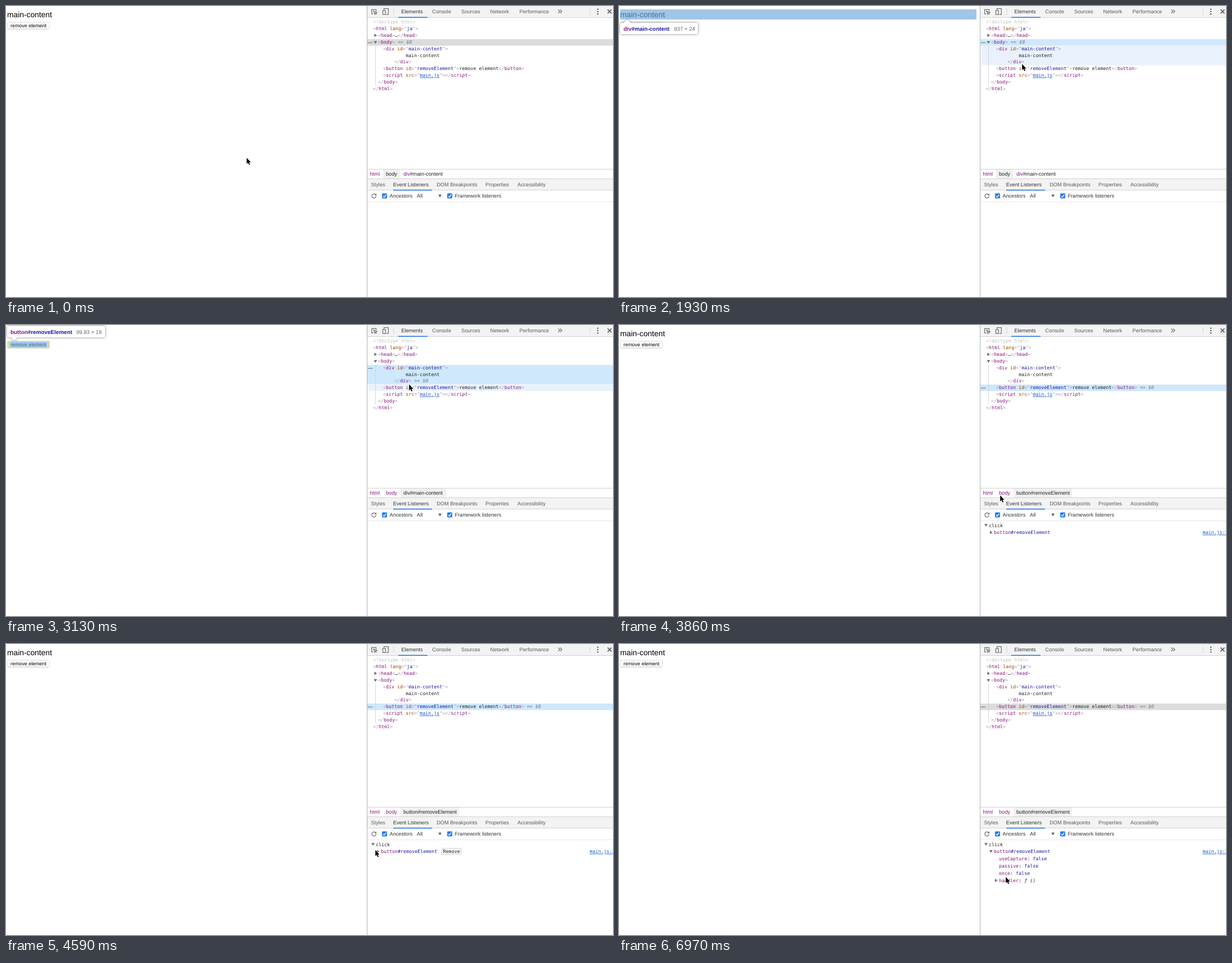
Recreate the animation shown at these times as an HTML page. Size 1080x518 px, loop 8000 ms.

```html
<!DOCTYPE html>
<html lang="en">
<head>
<meta charset="utf-8">
<style>
html, body { margin: 0; width: 100%; height: 100%; overflow: hidden; background: #fff; }
svg { display: block; }
text { font: 9.2px "Liberation Sans", Arial, sans-serif; white-space: pre; text-rendering: geometricPrecision; fill: #222; }
.code { font: 8.33px "DejaVu Sans Mono", Menlo, monospace; }
.page { font-size: 13.8px; fill: #000; }
.btn { font-size: 8.93px; fill: #000; }
.tip { font-size: 9.9px; font-weight: bold; }
.size { font-size: 9.5px; fill: #666; }
.tab { fill: #5a5a5a; }
.on { fill: #333; }
.g { fill: #a894a6; }
.t { fill: #881280; }
.n { fill: #994500; }
.v { fill: #1a1aa6; }
.doc { fill: #c0c0c0; }
.link { fill: #1155cc; text-decoration: underline; }
.dim { fill: #777; }
.it { font-style: italic; }
.icon { fill: none; stroke: #6e6e6e; stroke-width: 1.2; }
.shadow { filter: drop-shadow(0 0.7px 2px rgba(0,0,0,.5)); }
</style>
</head>
<body>
<svg id="stage" width="1080" height="518"></svg>
<script>
const LOOP = 8000, STEP = 148.3, LEAD = 12;
const stage = document.getElementById('stage');

const rect = (x, y, w, h, fill, more = '') =>
  `<rect x="${x}" y="${y}" width="${w}" height="${h}" fill="${fill}" ${more}/>`;
const path = (d, more = 'class="icon"') => `<path d="${d}" ${more}/>`;
const text = (x, y, s, cls = '') => `<text x="${x}" y="${y}" class="${cls}">${s}</text>`;
const code = (x, y, s) => text(x, y, s, 'code');
const span = (cls, s) => `<tspan class="${cls}">${s}</tspan>`;
const right = (x, y) => path(`M${x} ${y - 3}l4.6 3-4.6 3z`, 'fill="#6e6e6e"');
const down = (x, y) => path(`M${x} ${y - 2.2}h6l-3 4.6z`, 'fill="#6e6e6e"');

// DOM tree helpers
const lineY = i => 30.9 + 11.93 * i;
const open = (name, attr, val, cls = 'v') =>
  span('g', '&lt;') + span('t', name) +
  (attr ? ' ' + span('n', attr) + span('g', '="') + span(cls, val) + span('g', '"') : '') +
  span('g', '&gt;');
const close = name => span('g', '&lt;/') + span('t', name) + span('g', '&gt;');
const prop = (name, val, cls = 'v') => span('t', name) + ': ' + span(cls, val);
const fn = span('v it', 'ƒ') + span('it', ' ()');

const rows = { body: [59, 11.6], div: [71, 34.4], button: [106, 11.6] };

// Cursor tip: step, x, y
const track = [
  [2, 428, 270], [7, 705, 57], [8, 705, 57], [13, 717, 103], [20, 717, 103],
  [21, 717, 105.5], [22, 717, 107], [24, 717, 107], [26, 678, 303],
  [31, 657, 366.5], [33, 657, 366.5], [40, 671, 414.5], [43, 688, 414.5]
];

function cursorAt(k) {
  const j = track.findIndex(p => p[0] >= k);
  if (j < 0) return track[track.length - 1].slice(1);
  if (j === 0) return track[0].slice(1);
  const [a, ax, ay] = track[j - 1], [b, bx, by] = track[j];
  const u = (k - a) / (b - a), e = u * u * (3 - 2 * u);
  return [ax + (bx - ax) * e, ay + (by - ay) * e];
}

function page(target) {
  let s = text(2, 19.9, 'main-content', 'page') +
    rect(2.5, 28.8, 75, 12, '#fff', 'rx="2" stroke="#d4d4d4" stroke-width=".8"') +
    path('M4 41.1h72', 'stroke="#bdbdbd" stroke-width=".6"') +
    text(8, 37.9, 'remove element', 'btn');
  if (target === 'div') {
    s += rect(2, 6, 634, 18, 'rgba(111,168,220,.66)') +
      tooltip(30, 138.5, 'M8 30.2l6.5-5.7 6.5 5.7z', 'div', 'main-content', '837 × 24', 98);
  }
  if (target === 'button') {
    s += path('M2.5 28.6h75v12.7h-75zM8 30.2v9.6h64.5v-9.6z', 'fill="rgba(147,196,125,.55)"') +
      rect(3, 29.1, 74, 11.7, 'none', 'stroke="rgba(255,229,153,.66)"') +
      rect(8, 30.2, 64.5, 9.6, 'rgba(111,168,220,.66)') +
      tooltip(2, 174.5, 'M8 21.8l6.5 6 6.5-6z', 'button', 'removeElement', '99.83 × 18', 125);
  }
  return s;
}

function tooltip(y, w, arrow, tag, id, size, sizeX) {
  return `<g class="shadow">${rect(2, y, w, 20, '#fff', 'rx="2"')}${path(arrow, 'fill="#fff"')}</g>` +
    text(8, y + 13.7, span('t', tag) + span('v', '#' + id), 'tip') +
    text(sizeX, y + 13.5, size, 'size');
}

function tree(sel, hover, focused) {
  let s = '';
  const [sy, sh] = rows[sel];
  if (hover && hover !== sel) {
    const [y, h] = rows[hover];
    s += rect(645, y, 445, h, '#e9f1fc', 'rx="4"');
  }
  s += rect(643, sy, 437, sh, focused ? '#cfe8fc' : '#dcdcdc');
  for (const x of [645.3, 648.2, 651.1])
    s += `<circle cx="${x}" cy="${sy + 6.3}" r="1" fill="#6e6e6e"/>`;
  s += rect(657, 71, .8, 70, '#ccccd8');
  const mark = name => name === sel ? span('dim', ' == ') + span('dim it', '$0') : '';
  const lines = [
    [653, span('doc', '&lt;!doctype html&gt;')],
    [653, open('html', 'lang', 'ja')],
    [662, open('head') + '…' + close('head')],
    [662, open('body') + mark('body')],
    [671, open('div', 'id', 'main-content')],
    [711.3, 'main-content'],
    [691.2, close('div') + mark('div')],
    [671, open('button', 'id', 'removeElement') + 'remove element' + close('button') + mark('button')],
    [671, open('script', 'src', 'main.js', 'link') + close('script')],
    [662, close('body')],
    [653, close('html')]
  ];
  lines.forEach(([x, line], i) => s += code(x, lineY(i), line));
  return s + right(655.4, 52.3) + down(654.3, 64.8);
}

function crumbs(sel) {
  const last = sel === 'button' ? ['button', 'removeElement'] : ['div', 'main-content'];
  const s = sel === 'body' ? rect(671, 291, 30, 16, '#f0f0f0')
    : rect(702, 291, sel === 'div' ? 81 : 104, 16, '#f0f0f0');
  return s + text(647.6, 301.9, 'html', 't') +
    text(676, 301.9, 'body', sel === 'body' ? '' : 't') +
    text(707, 301.9, sel === 'body' ? span('t', last[0]) + '#' + last[1] : last.join('#'));
}

function check(x) {
  return rect(x, 333.6, 9, 9, '#2a7de9', 'rx="1.5"') +
    path(`M${x + 2} 338.2l2 2 3.2-4.4`, 'fill="none" stroke="#fff" stroke-width="1.3"');
}

function chrome() {
  const tabs = (y, list) => list.map(([x, s, on]) => text(x, y, s, on ? 'on' : 'tab')).join('');
  return rect(643, 0, 437, 20, '#f3f3f3') + rect(643, 20, 437, .9, '#ccc') +
    rect(698, 19.5, 52, 1.5, '#1a73e8') +
    path('M658.6 9V6.3h-8v7.8h2.8M654 9l6 2.2-2.6 1-1 2.6zM657.4 12.2l2.4 2.6') +
    path('M672.5 7V4.6h7.8v10.6h-3.6M670.4 8.2h4.8v7h-4.8z') +
    rect(689.5, 4, .8, 12, '#ccc') + rect(1038.6, 4, .8, 12, '#ccc') +
    path('M982.5 6.5l3 3.2-3 3.2M986 6.5l3 3.2-3 3.2') +
    [5.8, 10, 14.2].map(y => `<circle cx="1053" cy="${y}" r="1.2" fill="#5a5a5a"/>`).join('') +
    path('M1070.4 6.4l7 7m0-7l-7 7', 'stroke="#5a5a5a" stroke-width="1.5"') +
    tabs(12.9, [[703.3, 'Elements', 1], [758.3, 'Console'], [810, 'Sources'], [861.5, 'Network'], [913.6, 'Performance']]) +
    rect(643, 290, 437, .9, '#ccc') +
    rect(643, 307, 437, 21, '#f3f3f3') + rect(643, 307, 437, .8, '#ccc') + rect(643, 327.4, 437, .8, '#ccc') +
    rect(689, 326.9, 69, 1.5, '#1a73e8') +
    tabs(320.9, [[649.6, 'Styles'], [688.8, 'Event Listeners', 1], [766.2, 'DOM Breakpoints'], [853, 'Properties'], [910, 'Accessibility']]) +
    path('M657.6 335.6a3.8 3.8 0 1 0 .9 2.9') + path('M659 333.6v3.6h-3.6z', 'fill="#6e6e6e"') +
    check(669) + check(785) +
    tabs(341.3, [[682.5, 'Ancestors', 1], [731, 'All', 1], [798.4, 'Framework listeners', 1]]) +
    path('M769.3 335.8h5.6l-2.8 4.8z', 'fill="#5a5a5a"') +
    rect(643, 348, 437, .8, '#e4e4e4');
}

function listeners(k, cy) {
  const y = i => 359.5 + 12.87 * i;
  const expanded = k >= 33, inner = k >= 41 && k < 47;
  let s = down(650, 356.5) + code(658, y(0), 'click') +
    code(667, y(1), span('t', 'button') + span('v', '#removeElement')) +
    code(1038.4, y(1), span('link', 'main.js:3')) +
    (expanded ? down(658.8, 369.3) : right(660, 369.3));
  if (cy > 363 && cy < 376) {
    s += rect(775.3, 363.8, 34.6, 11, '#f8f8f8', 'rx="1.5" stroke="#c4c4c4" stroke-width=".8"') +
      code(777.6, y(1), 'Remove');
  }
  if (!expanded) return s;
  s += ['useCapture', 'passive', 'once'].map((n, i) => code(676, y(i + 2), prop(n, 'false'))).join('') +
    code(676, y(5), span('t', 'handler') + ': ' + fn) +
    (k >= 40 && k < 47 ? down(668, 420.7) : right(669, 420.7));
  if (inner) {
    const props = [
      prop('arguments', 'null', 'dim'), prop('caller', 'null', 'dim'), prop('length', '0'),
      prop('name', '""', 'n'), prop('prototype', '{constructor: ƒ}', 'it'),
      span('t', '__proto__') + ': ' + fn, prop('[[FunctionLocation]]', 'main.js:3', 'link')
    ];
    s += props.map((line, i) => code(685, y(i + 6), line)).join('') +
      right(678, y(10) - 3) + right(678, y(11) - 3);
  }
  return s;
}

function draw(k) {
  const [cx, cy] = cursorAt(k);
  const sel = k < 15 ? 'body' : k < 23 ? 'div' : 'button';
  const hover = k < 10 || k >= 25 ? '' : k < 21 ? 'div' : 'button';
  stage.innerHTML = page(hover) +
    tree(sel, hover, k >= 9 && k < 32) + chrome() + crumbs(sel) +
    (k >= 23 ? listeners(k, cy) : '') + rect(642, 0, 1, 518, '#b0b0b0') +
    path('M0 0V11.6L2.6 9.2 4.5 13.6 6.4 12.8 4.6 8.6H8Z',
      `transform="translate(${cx + .2} ${cy + .3}) scale(.92)" stroke="#fff" stroke-width="1.4" paint-order="stroke"`);
}

let shown = -1;
function tick() {
  const k = Math.floor((performance.now() % LOOP + LEAD) / STEP);
  if (k !== shown) draw(shown = k);
  requestAnimationFrame(tick);
}
tick();
</script>
</body>
</html>
```
